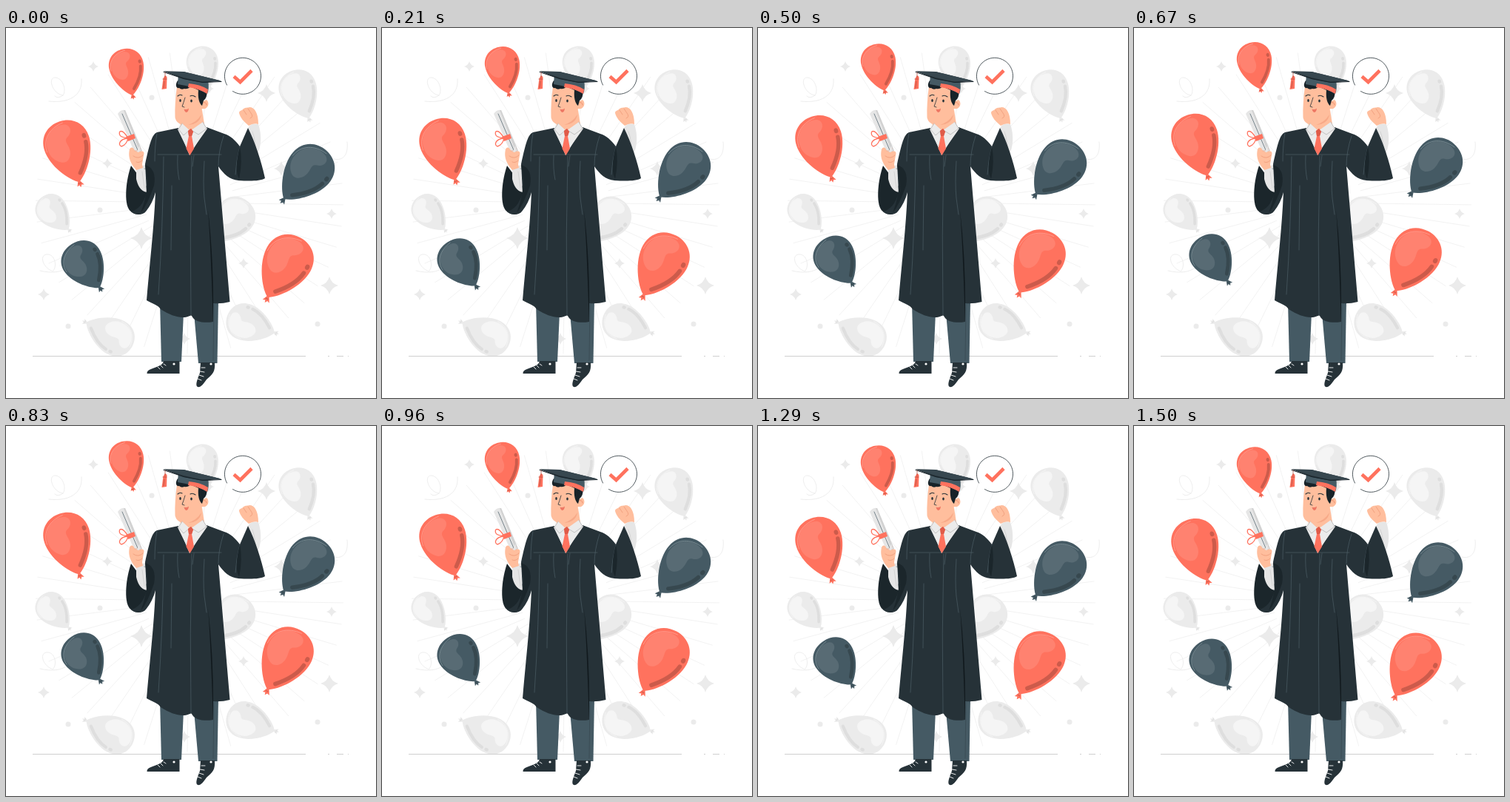
Write an HTML page that moves like this. It is 500 px wide and 500 px high and loops after 1.54 s.

```html
<!DOCTYPE html>
<html>
<head>
<meta charset="utf-8">
<title>Graduation</title>
<style>
html, body { margin: 0; width: 100%; height: 100%; overflow: hidden; background: #fff; }
svg { display: block; width: 100%; height: 100%; }
.line { fill: none; stroke-linecap: round; stroke-linejoin: round; }
</style>
</head>
<body>
<svg viewBox="0 0 500 500">
  <g id="rays" stroke="#f1f1f1" stroke-width=".9"></g>
  <g class="line" stroke="#ebebeb" stroke-width=".9">
    <path d="M58 99C84 102 104 92 102 69M77 91C62 89 56 66 67 67C77 68 82 84 77 91Q70 96 66 92"/>
    <path d="M46 328C62 332 76 330 84 323M64 329C50 325 45 308 54 306C65 304 70 320 64 328"/>
    <path d="M461 154C463 172 455 180 443 177"/>
  </g>
  <g id="sparks" fill="#ebebeb"></g>
  <g id="back"></g>
  <path d="M36 443.5H405M435 443.5h2M447 443.5h9M462 443.5h1" stroke="#cfcfcf"/>
  <g id="float"></g>

  <g id="bubble">
    <circle cx="320" cy="65" r="24.500" fill="#fff"/>
    <path class="line" d="M298.500 77A24.600 24.600 0 1 1 306.500 85.500" stroke="#263238" stroke-width=".8"/>
    <path class="line" d="M308 65.500L316.500 73L332 57.500" stroke="#ff725e" stroke-width="4.600" style="stroke-linecap:butt;stroke-linejoin:miter"/>
  </g>

  <g id="legs" fill="#455a64">
    <path d="M208 370L240 385L237 451H210Z"/>
    <path d="M254 385L287 368L285.500 453H260Z"/>
    <path class="line" d="M281 373L280 449" stroke="#37474f" stroke-width=".7"/>
    <g fill="#263238">
      <path d="M213 450H234.500V467H190.500C190 461 200 460 206 457Q212 455 213 450Z"/>
      <path d="M263 452H282C283 465 279 468 271 475C266 482 263 486 259 485C255 483 259 474 262 466Z"/>
    </g>
    <path class="line" d="M209 456l3 3M205 458l3 3M213 454l3 2M262 464l6 1M261 469l6 2M259 474l5 2M264 459h5" stroke="#fff" stroke-width=".9"/>
    <circle cx="227" cy="454" r="1.600" fill="#fff"/><circle cx="277" cy="454" r="1.600" fill="#fff"/>
  </g>

  <g id="arms">
    <path d="M169 186C162 206 160 232 165 243C170 253 181 254 188 249L193 218Z" fill="#1b262b"/>
    <path d="M176 189L188 185C188 200 190 211 190 222C181 220 178 212 176 204Z" fill="#e6e6e6"/>
    <path d="M327 137C327 132 333 128 341 130C346 144 345 162 339 172L327 158Z" fill="#e6e6e6"/>
    <path class="line" d="M333 140Q337 151 337 164M184 194L187 216" stroke="#c7c7c7" stroke-width=".6"/>
  </g>

  <path d="M204 141C197 144 194 157 188 184L190 222C186 238 178 246 169 248C176 254 185 252 189 248Q198 237 202 222C200 270 194 320 190 368C199 373 205 374 209 380C220 387 230 391 239 391C247 391 250 387 251 389C255 398 269 399 280 397V372Q291 373 302.500 370L287 187C294 197 302 205 314 206C329 207 344 207 350 203C345 180 337 155 327 135L316 160C310 152 303 145 295 143L271 134L248 172L233 135Z" fill="#263238"/>
  <path d="M273 246Q281 315 280 397C278 345 277 300 273 246Z" fill="#11191d"/>
  <g class="line" stroke="#52656e" stroke-width=".6">
    <path d="M205 171H291M204 142Q201 159 201 180M294 146Q287 167 287 186M251 173Q248 280 250 388M232 172Q231 191 234 205M254 172L252 187M268 180Q266 210 268 230L271 252M213 174Q212 270 206 360M224 213L223 300M316 160Q311 180 310 198M187 190Q201 193 194 219"/>
  </g>
  <path d="M316 160Q320 180 315 204Q308 191 316 160ZM188 185Q204 190 200 213Q191 239 182 250Q191 226 191 207Z" fill="#1b262b"/>

  <g id="head">
    <path d="M235 117L265 111L268 130L248 149L236 136Z" fill="#ffbe9d"/>
    <path d="M231 79C229 94 228 108 228.500 121C230 130 241 133 248 130C258 126 264 119 265 109C273 111 276 101 271 97L266 99L268 81L245 73Z" fill="#ffbe9d"/>
    <path d="M246 131Q258 127 264 117Q262 130 246 131Z" fill="#f7a988"/>
    <path d="M232 71C228 77 230 82 234 81Q237 84 241 82Q246 83 249 79L260 84C259 94 261 102 265 105L267 98Q272 95 272 82L262 73Z" fill="#182329"/>
    <path d="M233 61L273 71Q275 81 272 89Q255 79 232 76Z" fill="#455a64"/>
    <path d="M247 75Q262 76 273 83L272 89Q261 82 246 80Z" fill="#ff725e"/>
    <path d="M213 58.500L240 59L291 71.500L266 74L240 69Z" fill="#263238"/>
    <path d="M213 58.500L240 59L291 71.500L264 72.500L240 67Z" fill="#37474f"/>
    <path class="line" d="M213 59.500L240 68.500L266 73.500L291 72.500" stroke="#17232a"/>
    <path d="M215 64L217.500 66L217 82L210.500 83L212.500 68Z" fill="#ff725e"/>
    <path class="line" d="M215 60V67M214 72L213 81M212 69h5" stroke="#a84236" stroke-width=".7"/>
    <g class="line" stroke="#263238" stroke-width="1.100">
      <path d="M232 92Q235 89 238 91M249 92Q252 90 256 93"/>
      <path d="M242 94Q240 101 238 106L241 107" stroke-width=".8"/>
      <path d="M267 101Q270 99 271 104" stroke="#e98867" stroke-width=".8"/>
    </g>
    <ellipse cx="235.500" cy="98" rx="1.300" ry="2" fill="#263238"/>
    <ellipse cx="250.500" cy="98.500" rx="1.300" ry="2" fill="#263238"/>
    <path d="M240.500 109.500Q244 111 247 108.500Q246.500 114 243 114Q241 113 240.500 109.500Z" fill="#ee7864"/>
  </g>
  <g id="collar">
    <path d="M238 129L232 137L248 170L272 136L266 127L249 139Z" fill="#ebebeb"/>
    <path class="line" d="M238 129L233 137L240 145L249 137L260 144L271 136L266 127" stroke="#a6a6a6" stroke-width=".6"/>
    <path d="M246 139L250 136L253 140L251 146L254 163L248.500 172L243.500 163L247 146Z" fill="#ff725e"/>
    <path d="M246 139L250 136L253 140L251 146H247Z" fill="#df5b49"/>
  </g>

  <g id="fist">
    <path d="M328 132C321 126 317 122 315 115C315 111 319 112 321 109C324 107 327 108 329 107C336 107 341 115 341 130Q335 128 328 132Z" fill="#ffbe9d"/>
    <path class="line" d="M321 111L325 117M327 109L331 115Q335 120 330 122" stroke="#eb9674" stroke-width=".7"/>
  </g>
  <g id="diploma">
    <path d="M151 116Q155 110 161 111L184 166L175 171Z" fill="#e6e6e6"/>
    <path d="M159 111L161 111L184 166L181 168Z" fill="#d2d2d2"/>
    <path class="line" d="M157 116L178 165" stroke="#455a64" stroke-width=".7"/>
    <path d="M162 147L173 143L175 149L165 153Z" fill="#ff725e"/>
    <path class="line" d="M165 149C157 135 151 139 154 145C156 148 161 148 165 149C153 150 151 158 156 160C161 159 164 153 165 149" stroke="#ff725e" stroke-width="1.300"/>
    <path d="M167 164C169 159 173 162 174 166L179 168C184 165 188 167 186 172L184 184L185 189L176 192L172 187C167 180 165 172 167 164Z" fill="#ffbe9d"/>
    <path class="line" d="M174 166Q179 167 181 163M172 173Q179 178 185 172M176 181Q180 183 184 179" stroke="#eb9674" stroke-width=".7"/>
    <path d="M177 167L182 166L180 159Z" fill="#e6e6e6"/>
  </g>
</svg>
<script>
const get = id => document.getElementById(id);
const palettes = {
  red: ['#ff725e', '#ff8270', '#cc5b4b', '#ffaa9e'],
  slate: ['#455a64', '#586b74', '#37484f', '#8c9ca3'],
  grey: ['#ebebeb', '#f5f5f5', '#dedede', '#f8f8f8']
};

// The tip is at the local origin; the body is one unit wide and high.
function balloon(x, y, angle, width, height, name) {
  const [base, light, shade, rim] = palettes[name];
  const line = (d, color, w) =>
    `<path class="line" d="${d}" stroke="${color}" stroke-width="${w}" vector-effect="non-scaling-stroke"/>`;
  return `<g transform="translate(${x} ${y}) rotate(${angle})">
    <path d="M-1 -2L-4 5L-1 4L0 7L2 4L5 5L1 -2Z" fill="${base}" transform="scale(${width / 65 + .1})"/>
    <path d="M-2 2H2" stroke="${shade}"/>
    <g transform="scale(${width} ${height})">
      <path d="M0 0C-.2-.08-.5-.38-.5-.64C-.5-.86-.28-1 0-1S.5-.86 .5-.64C.5-.38 .2-.08 0 0Z" fill="${base}"/>
      <path d="M-.43-.62C-.44-.83-.21-.95 0-.94C.22-.93 .2-.78 .06-.73C-.06-.69 .04-.61 .02-.51C0-.4-.12-.33-.24-.38C-.36-.43-.43-.52-.43-.62Z" fill="${light}"/>
      ${line('M.4-.57C.38-.42 .23-.25 .08-.13', shade, width * .085)}
      ${line('M-.46-.6C-.47-.8-.27-.95 .05-.965', rim, .7)}
      <ellipse cx=".405" cy="-.67" rx=".045" ry=".04" fill="${shade}"/>
    </g>
  </g>`;
}
const balloons = list => list.map(b => balloon(...b)).join('');

get('float').innerHTML = balloons([
  [171, 91, -12, 47, 64, 'red'],
  [99, 208, -18, 63, 86, 'red'],
  [126.5, 351, -33, 56, 70, 'slate'],
  [353.5, 364, 29, 67, 92, 'red'],
  [375.500, 231, 41, 64, 87, 'slate']
]);
get('back').innerHTML = balloons([
  [272, 84, -10, 43, 60, 'grey'],
  [409, 122, -20, 51, 68, 'grey'],
  [84.5, 272.5, -41, 42, 57, 'grey'],
  [108.5, 398, 117, 50, 70, 'grey'],
  [363, 412, -70, 50, 68, 'grey'],
  [282, 288, 40, 53, 70, 'grey']
]);

const sparks = [[118, 52, 7], [137, 183, 7], [183, 284, 15], [51, 360, 8], [437, 348, 12], [440, 251, 7],
  [321, 318, 7], [352, 88, 12], [372, 190, 10], [241, 420, 8], [275, 82, 6]];
const dots = [[197, 94], [127, 246], [84, 403], [421, 400]];
get('sparks').innerHTML = sparks.map(([x, y, r]) => {
  const k = r * .22;
  return `<path d="M${x} ${y - r}Q${x + k} ${y - k} ${x + r} ${y}Q${x + k} ${y + k} ${x} ${y + r}Q${x - k} ${y + k} ${x - r} ${y}Q${x - k} ${y - k} ${x} ${y - r}"/>`;
}).join('') + dots.map(([x, y]) => `<circle cx="${x}" cy="${y}" r="3.500"/>`).join('');

const rayCount = 44;
get('rays').innerHTML = Array.from({ length: rayCount }, (_, i) => {
  const a = (i + .1) / rayCount * 2 * Math.PI, c = Math.cos(a), s = Math.sin(a);
  return `<path d="M${248 + 60 * c} ${236 + 60 * s}L${248 + 208 * c} ${236 + 204 * s}"/>`;
}).join('');

const period = 1540, lead = 60, rise = 10;
const start = performance.now();
function draw(now) {
  const phase = (Math.max(0, now - start) + lead) / period % 1;
  const lift = rise * (1 - Math.abs(1 - 2 * phase));
  get('float').setAttribute('transform', `translate(0 ${.8 - lift})`);
  requestAnimationFrame(draw);
}
draw(start);
</script>
</body>
</html>
```
